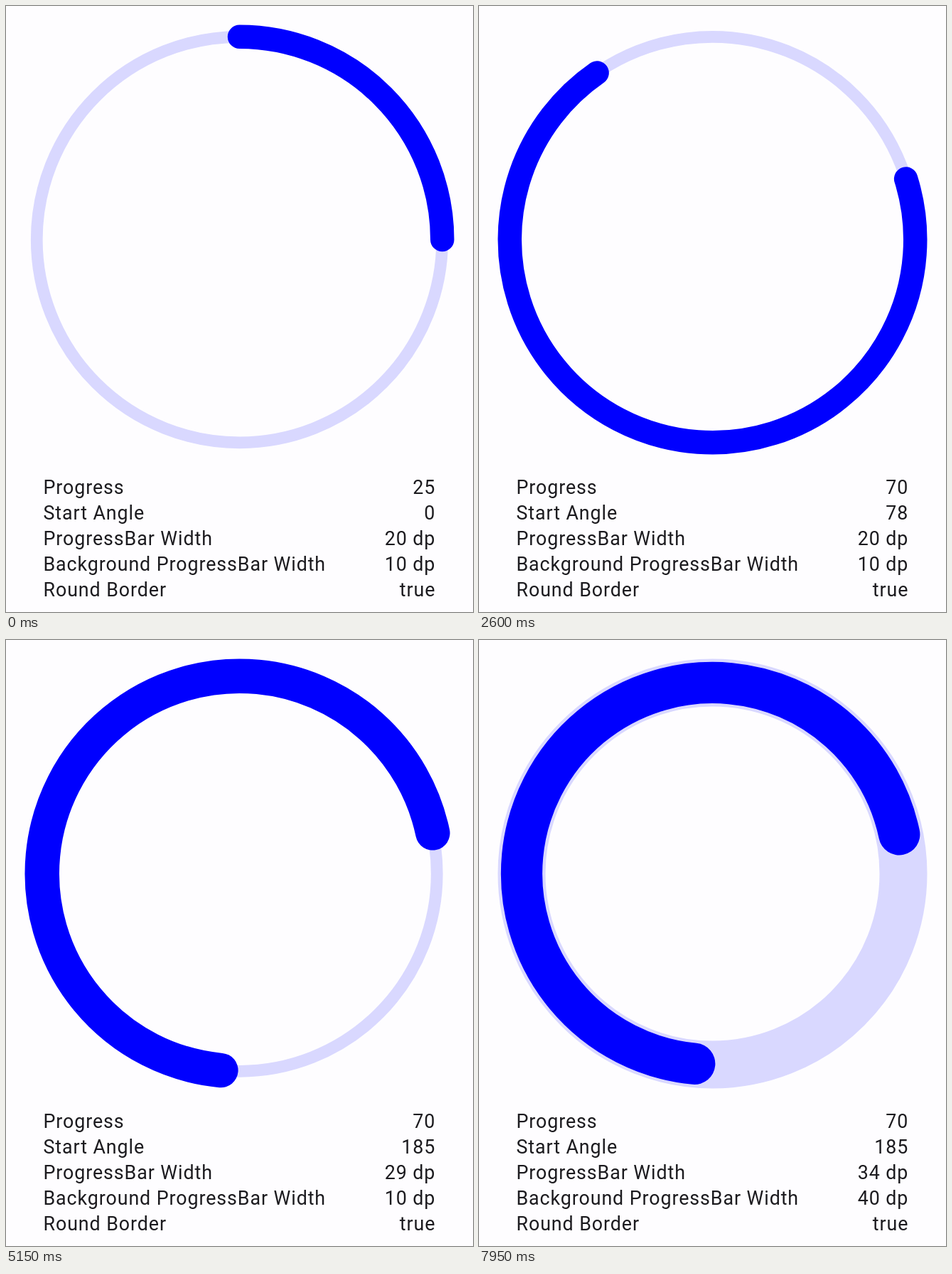
An HTML page that plays this animation: 657 px wide and 852 px high, repeating every 8 s.

```html
<!DOCTYPE html>
<html lang="en">
<head>
<meta charset="utf-8">
<title>Circular progress bar</title>
<style>
  html, body { margin: 0; width: 100%; height: 100%; overflow: hidden; background: #fefdff; }
  svg { display: block; width: 657px; height: 852px; }
  circle { fill: none; }
  text { font: 26.8px Roboto, sans-serif; letter-spacing: .92px; fill: #1c1b1f; }
  .value { text-anchor: end; }
</style>
</head>
<body>
<svg viewBox="0 0 657 852">
  <circle id="track" cx="328.5" cy="328.5" stroke="#d9d8ff"/>
  <circle id="bar" cx="328.5" cy="328.5" stroke="#00f" stroke-linecap="round" pathLength="100"/>
  <ellipse id="thumb" cy="863" rx="24" ry="12.6" fill="#dddce0"/>
  <g id="rows"></g>
</svg>
<script>
const LOOP = 8000, STEP = 50, DP = 1.675, OUTER = 302;
const $ = id => document.getElementById(id);

// Slider positions over time: [ms, value]
const keys = {
  progress: [[100, 25], [900, 54], [1350, 66.9], [1690, 70], [1810, 70.2]],
  angle: [[1980, 0], [2200, 20], [2600, 78.4], [2850, 115], [3300, 165], [3700, 183], [3950, 185.4]],
  width: [[4330, 20], [5150, 29.4], [5900, 34.8]],
  track: [[6750, 10], [6950, 15.1], [7700, 35.2], [7870, 40]]
};

function valueAt(list, t) {
  if (t <= list[0][0]) return list[0][1];
  for (let i = 1; i < list.length; i++) {
    const [t0, v0] = list[i - 1], [t1, v1] = list[i];
    if (t < t1) return v0 + (v1 - v0) * (t - t0) / (t1 - t0);
  }
  return list[list.length - 1][1];
}

// The drawn shape trails the slider slightly
const trailing = (list, t) =>
  [0, 20, 40, 60, 80].reduce((sum, d) => sum + valueAt(list, t - d), 0) / 5;

function addText(x, y, content, cls) {
  const el = document.createElementNS("http://www.w3.org/2000/svg", "text");
  el.setAttribute("x", x);
  el.setAttribute("y", y);
  el.setAttribute("class", cls);
  el.textContent = content;
  $("rows").append(el);
  return el;
}

const labels = ["Progress", "Start Angle", "ProgressBar Width", "Background ProgressBar Width", "Round Border"];
const values = labels.map((label, i) => {
  const y = 686 + 36 * i;
  addText(52.5, y, label, "label");
  return addText(604.3, y, "true", "value");
});

function set(el, attrs) {
  for (const name in attrs) el.setAttribute(name, attrs[name]);
}

function draw(t) {
  Object.values(keys).forEach((list, i) => {
    values[i].textContent = Math.floor(valueAt(list, t)) + (i > 1 ? " dp" : "");
  });
  const [progress, angle, width, track] = Object.values(keys).map(list => trailing(list, t));
  const r = OUTER - Math.max(width, track) * DP / 2;
  set($("track"), { r, "stroke-width": track * DP });
  set($("bar"), {
    r,
    "stroke-width": width * DP,
    "stroke-dasharray": `${progress} 100`,
    transform: `rotate(${angle - 90} 328.5 328.5)`
  });
  set($("thumb"), {
    cx: 150 + 4 * progress,
    visibility: t > 50 && t < 1850 ? "visible" : "hidden"
  });
}

const start = performance.now();
function tick() {
  const t = (performance.now() - start) % LOOP;
  draw(Math.floor(t / STEP) * STEP);
  requestAnimationFrame(tick);
}
tick();
</script>
</body>
</html>
```
